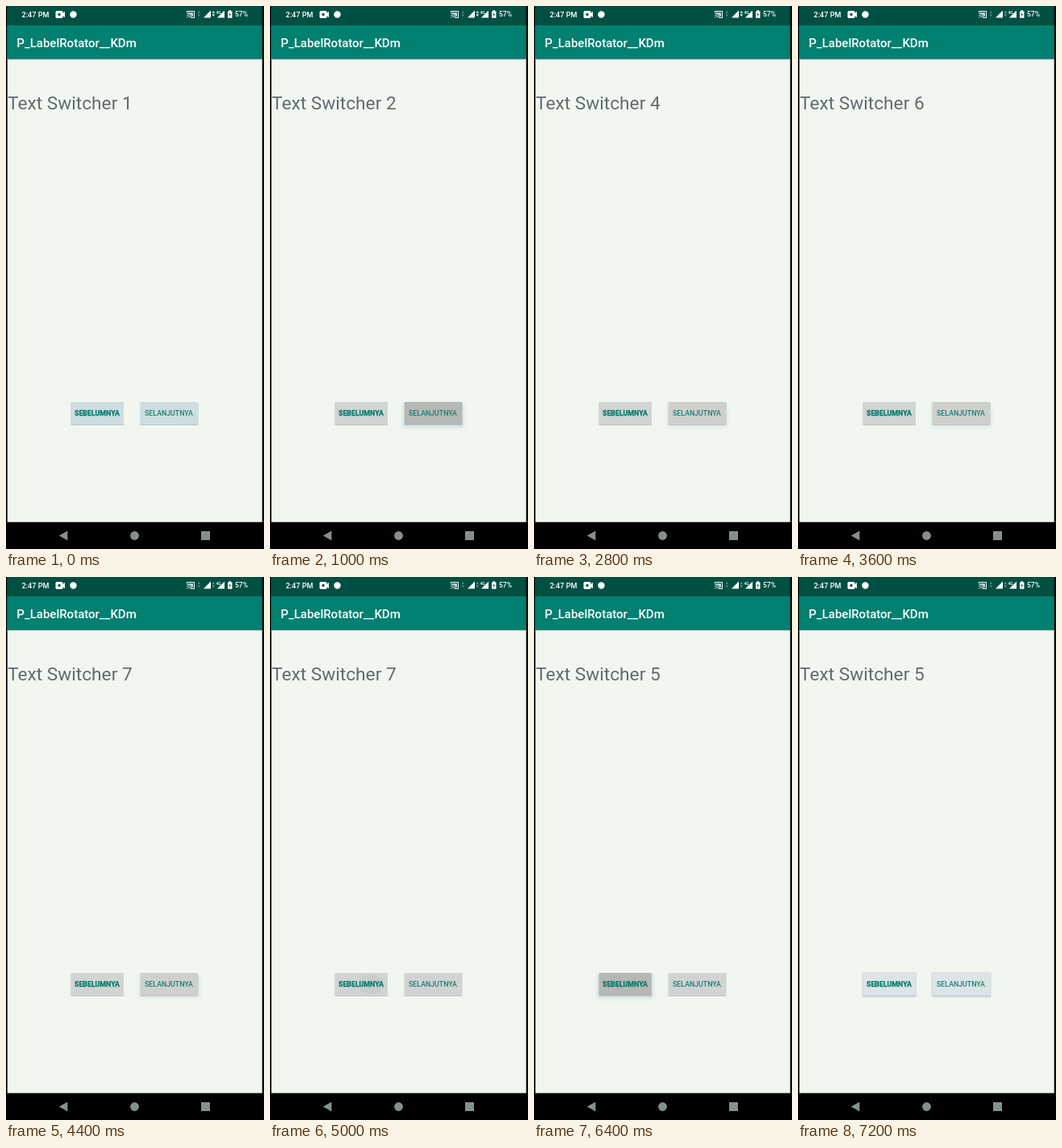
An HTML page that plays this animation: 320x672 px, repeating every 7400 ms.

```html
<!DOCTYPE html>
<html lang="id">
<head>
<meta charset="utf-8">
<title>Text Switcher</title>
<style>
  html, body { margin: 0; width: 100%; height: 100%; overflow: hidden; background: #000; }
  svg { display: block; font-family: Roboto, sans-serif; font-weight: 500; }
  .label { font-size: 8.8px; fill: #1a7f72; }
  .strong { font-weight: 700; fill: #00796b; stroke: #00796b; stroke-width: .25; }
</style>
</head>
<body>
<svg width="320" height="672" viewBox="0 0 320 672">
  <defs>
    <filter id="blur" x="-30%" y="-50%" width="160%" height="200%"><feGaussianBlur stdDeviation="2"/></filter>
  </defs>
  <rect width="320" height="672"/>
  <rect x="1.7" y="66" width="316" height="572.7" fill="#f1f7f0"/>
  <rect x="1.2" width="316.6" height="24" fill="#004f43"/>
  <rect x="1.2" y="24" width="316.6" height="41.7" fill="#008070"/>
  <rect x="1.7" y="65.700" width="316" height="1.500" fill="#dfe9e4"/>

  <g fill="#fff">
    <text x="19.5" y="13.6" font-size="9.1">2:47 PM</text>
    <path d="M63 6h6q1.5 0 1.5 1.5v1.2l2.5-2v7.6l-2.5-2v1.2q0 1.5-1.5 1.5h-6q-1.5 0-1.5-1.5v-6q0-1.5 1.5-1.5z"/>
    <circle cx="66" cy="10.5" r="1.7" fill="#004f43"/>
    <circle cx="83.5" cy="10.5" r="4.2"/>
    <path d="M224.5 8.5v-2h9v8h-4M224.5 14.5v-1M224.5 11.5q3 0 3 3M224.5 9.5q5 0 5 5" fill="none" stroke="#fff"/>
    <path d="M226 8h6v5h-1.500q-1-3.500-4.500-4z" opacity=".75"/>
    <path d="M239.3 6l1.5 2.5h-3zM239.3 13l1.5-2.5h-3z" opacity=".4"/>
    <path d="M254 5.5v9h-9z"/>
    <path id="data" d="M257.3 6l1.7 2.7h-3.4zM257.3 13l1.7-2.7h-3.4z"/>
    <path d="M271 5.5v9h-9z"/>
    <text x="260.5" y="9.8" font-size="5">4G</text>
    <path d="M276.5 6.5v-1.2h2.6v1.2h1.4v8.2h-5.4v-8.2z"/>
    <path d="M277.8 8l-1.3 3h1.1v2.3l1.5-3h-1.2z" fill="#004f43"/>
    <text x="284" y="13.4" font-size="8.5">57%</text>
    <text x="13.3" y="51" font-size="15">P_LabelRotator__KDm</text>
  </g>

  <text id="message" x="2" y="128" font-size="22.7" font-weight="400" fill="#606c70"></text>

  <g id="buttons"></g>
  <text class="label strong" x="85" y="507">SEBELUMNYA</text>
  <text class="label" x="172" y="507">SELANJUTNYA</text>

  <g fill="#84908c">
    <path d="M65.8 655.5l10.600-6v12z"/>
    <circle cx="159.5" cy="655.5" r="5.4"/>
    <rect x="242" y="650" width="11" height="11"/>
  </g>
</svg>
<script>
const LOOP = 7400, STEP = 200;
// [time, direction] of each tap
const taps = [[1000, 1], [2200, 1], [2600, 1], [3000, 1], [3400, 1], [4200, 1], [5200, -1], [6400, -1]];
const byId = id => document.getElementById(id);

function shape(name, attrs) {
  const el = document.createElementNS('http://www.w3.org/2000/svg', name);
  for (const key in attrs) el.setAttribute(key, attrs[key]);
  return byId('buttons').appendChild(el);
}

function makeButton(x, width, direction) {
  const box = { x, y: 490, width, height: 28, rx: 1 };
  return {
    direction,
    halo: shape('rect', { ...box, x: x - 2, y: 492, width: width + 4, height: 30, fill: '#c4d9e2', filter: 'url(#blur)' }),
    glow: shape('rect', { ...box, x: x - 1.5, y: 489, width: width + 3, height: 32, rx: 2, fill: '#dce4e6' }),
    edge: shape('rect', { ...box, y: 491, fill: '#bac8c9' }),
    face: shape('rect', box),
    ripple: shape('ellipse', { cx: x + width / 2 + 12, cy: 504, rx: 16, ry: 12, fill: '#c3cac8' })
  };
}

const buttons = [makeButton(80.5, 65.5, -1), makeButton(166.7, 71.7, 1)];

function restColor(t) {
  return t < 800 ? '#cddde0' : t < 6800 ? '#d1d4d2' : '#dce4e6';
}

function drawButton(button, t) {
  const sinceTap = when => taps.some(([time, dir]) => dir === button.direction && t - time === when);
  const pressed = sinceTap(0), fading = sinceTap(STEP), starting = sinceTap(-STEP);
  button.face.setAttribute('fill', pressed ? '#b6b8b5' : fading ? '#cfd0cc' : restColor(t));
  button.halo.setAttribute('opacity', pressed ? .7 : fading ? .4 : 0);
  button.glow.setAttribute('opacity', t < 6800 ? 0 : 1);
  button.ripple.setAttribute('opacity', starting && !pressed && !fading ? .6 : 0);
}

function draw(now) {
  const t = Math.floor(now % LOOP / STEP) * STEP;
  const count = taps.reduce((n, [time, dir]) => t >= time ? n + dir : n, 1);
  byId('message').textContent = 'Text Switcher ' + count;
  byId('data').setAttribute('opacity', t < 3000 ? 1 : .45);
  buttons.forEach(button => drawButton(button, t));
}

const start = performance.now();
function tick() {
  draw(performance.now() - start);
  requestAnimationFrame(tick);
}
tick();
</script>
</body>
</html>
```
